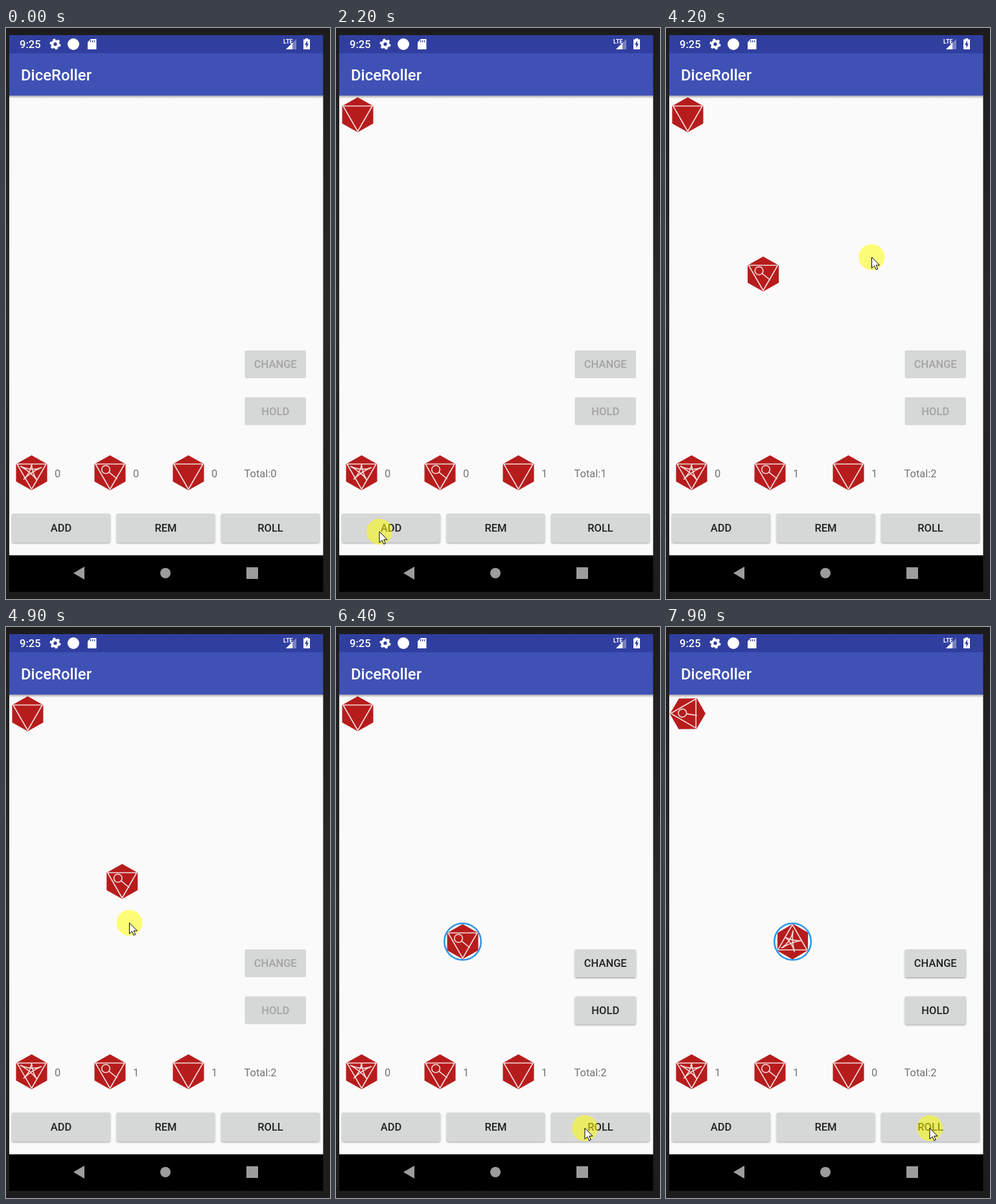
An HTML page for the animation above (8 s loop, 500 by 882 pixels).

```html
<!DOCTYPE html>
<html lang="en">
<head>
<meta charset="utf-8">
<title>Dice roller</title>
<style>
  html, body { margin: 0; width: 100%; height: 100%; overflow: hidden; background: #1f1f1f; }
  svg { display: block; width: 100%; height: 100%; font: 16.5px Roboto, sans-serif; }
  .medium { font-weight: 500; }
  .count { fill: #757575; }
  .line { fill: none; stroke: #f6dede; stroke-width: 1.6; stroke-linejoin: round; stroke-linecap: round; }
</style>
</head>
<body>
<svg viewBox="0 0 500 882">
  <defs>
    <linearGradient id="desk" x2="0" y2="1">
      <stop stop-color="#1c1c1c"/><stop offset=".5" stop-color="#292929"/><stop offset="1" stop-color="#1c1c1c"/>
    </linearGradient>
    <linearGradient id="barShadow" x2="0" y2="1">
      <stop stop-color="#000" stop-opacity=".32"/><stop offset="1" stop-color="#000" stop-opacity="0"/>
    </linearGradient>
    <filter id="raised" x="-5%" y="-10%" width="110%" height="130%">
      <feDropShadow dx="0" dy="1.5" stdDeviation="1.2" flood-opacity=".35"/>
    </filter>
    <g id="blank">
      <path d="M0-27L24-13.5V13.5L0 27L-24 13.5V-13.5Z" fill="#b71c1c"/>
      <path class="line" d="M-22.5-13.5H22.5L0 25.5Z"/>
    </g>
    <g id="lens">
      <use href="#blank"/>
      <circle class="line" cx="-6.5" cy="-5" r="6.3"/>
      <path class="line" d="M-1.6-.8L10.5 9"/>
    </g>
    <g id="star">
      <use href="#blank"/>
      <path class="line" d="M-17-10Q0-2 15-8Q0-2-12 10Q-2 0 0-13Q1 0 8 11Q0 0-17-10Z"/>
    </g>
  </defs>

  <rect width="500" height="882" fill="url(#desk)"/>
  <path fill="#fafafa" d="M5 104H489.400V815H5Z"/>
  <path fill="#303f9f" d="M5 11H489.400V39H5Z"/>
  <path fill="#3f51b5" d="M5 39H489.400V104.400H5Z"/>
  <path fill="url(#barShadow)" d="M5 104.400H489.400V109H5Z"/>
  <path d="M5 814.400H489.400V871H5Z"/>
  <g fill="#9c9c9c">
    <path d="M104 842L121 832V852Z"/>
    <circle cx="246" cy="842" r="8"/>
    <path d="M371 833H389V851H371Z"/>
  </g>

  <g fill="#fff">
    <text class="medium" x="21" y="31">9:25</text>
    <text class="medium" x="23" y="81" font-size="23.9">DiceRoller</text>
    <g fill="none" stroke="#fff">
      <circle cx="76" cy="25" r="4.7" stroke-width="4"/>
      <circle cx="76" cy="25" r="7.3" stroke-width="2.4" pathLength="12" stroke-dasharray="1"/>
    </g>
    <circle cx="104" cy="25" r="9"/>
    <path d="M131 17H139.500V33H126V22Z"/>
    <path d="M130.500 19V22M133.500 19V22M136.500 19V22" stroke="#303f9f" stroke-width="1.3"/>
    <path d="M448 17V33H432Z" opacity=".35"/>
    <path d="M442 23V33H432Z"/>
    <text x="428" y="24" font-size="9" font-weight="700">LTE</text>
    <path d="M462 17.500V16H466V17.500H469V33H459V17.500Z"/>
    <path d="M465 19.500L461 26H463.500V31L467 24.500H465Z" fill="#303f9f"/>
  </g>

  <g id="buttons"></g>
  <g id="tally"></g>
  <use id="first"/>
  <use id="second"/>
  <circle id="ring" cx="195.500" cy="486" r="28.300" fill="none" stroke="#2f96e8" stroke-width="2.500"/>
  <g id="cursor">
    <circle r="20" fill="#ff0" fill-opacity=".52"/>
    <path d="M0 0V17L4 13.300L6.800 19.300L9.300 18.200L6.700 12.300H12Z" fill="#fff" stroke="#000"/>
  </g>
</svg>
<script>
const LOOP = 8000, STEP = 100, DRAG_LAG = 100;
const $ = id => document.getElementById(id);
const clamp = (value, low, high) => Math.min(high, Math.max(low, value));

const entry = { x: 466, y: 844 };
const moves = [
  { from: 1000, to: 1600, x: 67, y: 778 },     // to ADD
  { from: 2700, to: 3200, x: 87, y: 131 },     // to the second die
  { from: 3400, to: 3800, x: 150, y: 380 },    // drag it down
  { from: 3900, to: 4200, x: 317.5, y: 354 },  // wander off
  { from: 4300, to: 4500, x: 150, y: 380 },    // grab it again
  { from: 4500, to: 4600, x: 163, y: 300 },
  { from: 4600, to: 5000, x: 195.5, y: 486 },  // drop and select it
  { from: 5500, to: 6100, x: 384, y: 774 },    // to ROLL
  { from: 6400, to: 6800, x: 407, y: 774 }
];

function cursorAt(time) {
  let { x, y } = entry;
  for (const move of moves) {
    const part = clamp((time - move.from) / (move.to - move.from), 0, 1);
    const eased = part * part * (3 - 2 * part);
    x += (move.x - x) * eased;
    y += (move.y - y) * eased;
  }
  return [x, y];
}

// The second die trails the cursor while it is held.
function draggedDieAt(time) {
  const held = time - DRAG_LAG;
  if (held <= 3400) return [92, 134];
  return cursorAt(held < 4500 ? Math.min(held, 3800) : held < 5000 ? held : 5000);
}

function addButton(label, x, y, width, height) {
  $('buttons').insertAdjacentHTML('beforeend',
    `<g><rect x="${x}" y="${y}" width="${width}" height="${height}" rx="2.4"/>
     <text class="medium" x="${x + width / 2}" y="${y + height / 2 + 5.8}" text-anchor="middle">${label}</text></g>`);
  const [box, text] = $('buttons').lastElementChild.children;
  return (enabled, pressed) => {
    box.setAttribute('fill', pressed ? '#c3c4c4' : '#d6d7d7');
    box.setAttribute('filter', enabled ? 'url(#raised)' : 'none');
    text.setAttribute('fill', enabled ? '#212121' : '#a4a4a4');
  };
}
const [change, hold] = ['CHANGE', 'HOLD'].map((label, i) => addButton(label, 368.5, 498 + 72.5 * i, 94.5, 43));
const [add, remove, roll] = ['ADD', 'REM', 'ROLL'].map((label, i) => addButton(label, 9 + 161.5 * i, 750, 152, 44.5));

['star', 'lens', 'blank', ''].forEach((face, i) => {
  const x = 39.5 + 121 * i;
  if (face) $('tally').insertAdjacentHTML('beforeend', `<use href="#${face}" x="${x}" y="687"/>`);
  $('tally').insertAdjacentHTML('beforeend', `<text class="count" x="${face ? x + 35.5 : 367.5}" y="694"/>`);
});
const counts = $('tally').querySelectorAll('text');

function show(node, visible) {
  node.style.display = visible ? '' : 'none';
}

function placeDie(node, face, [x, y], angle) {
  node.setAttribute('href', '#' + face);
  node.setAttribute('transform', `translate(${x} ${y}) rotate(${angle})`);
}

function draw(time) {
  const within = (from, to) => time >= from && time < to;
  const hasFirst = time >= 1800, hasSecond = time >= 2500;
  const selected = time >= 5400, rolled = time >= 7100;
  const spin = Math.max(0, time - 7000) / 900;

  change(selected);
  hold(selected);
  add(true, within(1700, 2000) || within(2400, 2600));
  remove(true);
  roll(true, within(7000, 7300));

  show($('first'), hasFirst);
  show($('second'), hasSecond);
  show($('ring'), selected);
  placeDie($('first'), rolled ? 'lens' : 'blank', [33.5, 134], 330 * spin);
  placeDie($('second'), rolled ? 'star' : 'lens', draggedDieAt(time), 300 * spin);

  const values = [+rolled, +hasSecond, +(hasFirst && !rolled), 'Total:' + (hasFirst + hasSecond)];
  counts.forEach((node, i) => node.textContent = values[i]);

  show($('cursor'), time >= 1000);
  $('cursor').setAttribute('transform', `translate(${cursorAt(time)})`);
}

const start = performance.now();
function tick() {
  const elapsed = (performance.now() - start) % LOOP;
  draw(Math.floor(elapsed / STEP) * STEP);
  requestAnimationFrame(tick);
}
tick();
</script>
</body>
</html>
```
